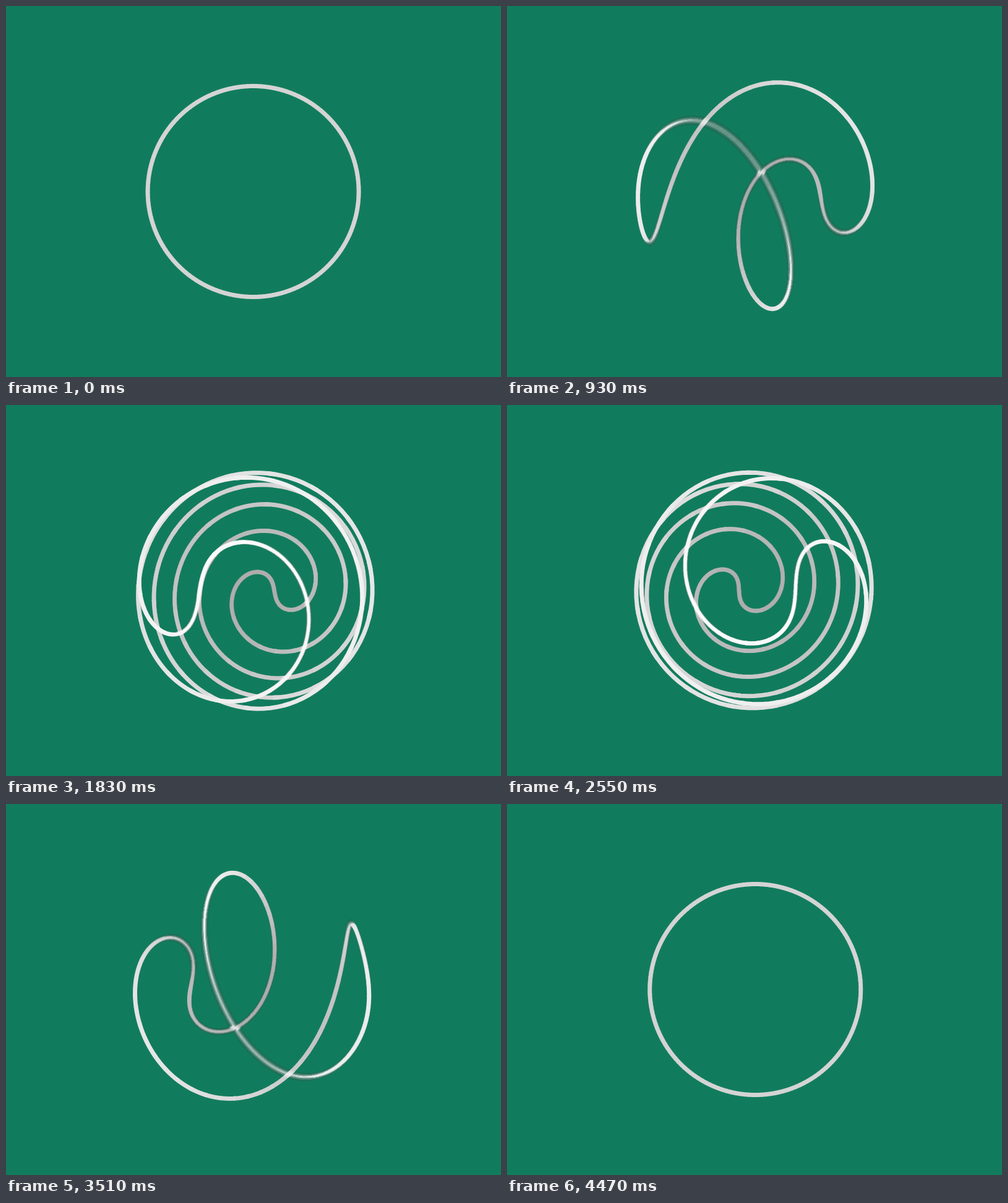
Recreate the animation shown at these times as an HTML page with a canvas. Size 800 by 600 pixels, loop 4.5 s.

```html
<!DOCTYPE html>
<html lang="en">
<head>
<meta charset="utf-8">
<title>Twisting loop on a sphere</title>
<style>
  html, body { margin: 0; height: 100%; overflow: hidden; background: #117c5d; }
  canvas { position: absolute; left: 200px; top: 100px; }
</style>
</head>
<body>
<canvas id="stage" width="400" height="400"></canvas>
<script>
const SIZE = 400;
const LOOP = 4500, STEP = 30, SHUTTER = 15, SAMPLES = 6;
const POINTS = 900, CHUNK = 6;
const RADIUS = 170.5;        // projected radius of a great circle facing the viewer
const PERSPECTIVE = 0.462;   // sphere radius / camera distance

const stage = document.getElementById('stage').getContext('2d');
const layerCanvas = document.createElement('canvas');
layerCanvas.width = layerCanvas.height = SIZE;
const layer = layerCanvas.getContext('2d', { willReadFrequently: true });
layer.lineWidth = 7;
layer.lineJoin = 'round';

const smooth = p => p * p * (3 - 2 * p);

// A great circle through both poles, wound around the polar axis.
function curveAt(time) {
  const p = time / LOOP;
  const turn = Math.PI * (p - 0.5);
  const twist = 3 * Math.PI * smooth((1 - Math.cos(2 * Math.PI * p)) / 2);
  const sinTurn = Math.sin(turn), cosTurn = Math.cos(turn);
  return Array.from({ length: POINTS }, (_, i) => {
    const s = 2 * Math.PI * i / POINTS;
    const along = Math.cos(s), out = Math.sin(s);
    const angle = -twist * along;
    const side = out * Math.sin(angle), up = out * Math.cos(angle);
    const z = along * cosTurn - side * sinTurn;
    const scale = RADIUS / (1 - PERSPECTIVE * z);
    return {
      x: SIZE / 2 + scale * (along * sinTurn + side * cosTurn),
      y: SIZE / 2 - scale * up,
      z
    };
  });
}

// Short overlapping pieces, painted from back to front and lighter when nearer.
function drawCurve(time) {
  const points = curveAt(time);
  const at = i => points[i % POINTS];
  const depth = start => at(start + CHUNK / 2).z;
  const starts = [];
  for (let i = 0; i < POINTS; i += CHUNK) starts.push(i);
  starts.sort((a, b) => depth(a) - depth(b));

  layer.clearRect(0, 0, SIZE, SIZE);
  for (const start of starts) {
    const grey = Math.round(Math.min(255, 212 + 40 * depth(start)));
    layer.strokeStyle = `rgb(${grey},${grey},${grey})`;
    layer.beginPath();
    for (let i = start; i <= start + CHUNK + 1; i++) layer.lineTo(at(i).x, at(i).y);
    layer.stroke();
  }
}

// Motion blur: colour and alpha are averaged separately, empty pixels counting
// as black, which darkens the edges of fast parts.
const sums = new Uint16Array(SIZE * SIZE * 4);
const picture = stage.createImageData(SIZE, SIZE);

function render(time) {
  sums.fill(0);
  for (let n = 0; n < SAMPLES; n++) {
    drawCurve(time + SHUTTER * (n + 0.5) / SAMPLES);
    const { data } = layer.getImageData(0, 0, SIZE, SIZE);
    for (let i = 0; i < data.length; i++) sums[i] += data[i];
  }
  for (let i = 0; i < sums.length; i++) picture.data[i] = sums[i] / SAMPLES;
  stage.putImageData(picture, 0, 0);
}

let start, shown;
function tick(now) {
  start ??= now;
  const time = Math.floor((now - start) % LOOP / STEP) * STEP;
  if (time !== shown) render(shown = time);
  requestAnimationFrame(tick);
}
requestAnimationFrame(tick);
</script>
</body>
</html>
```
